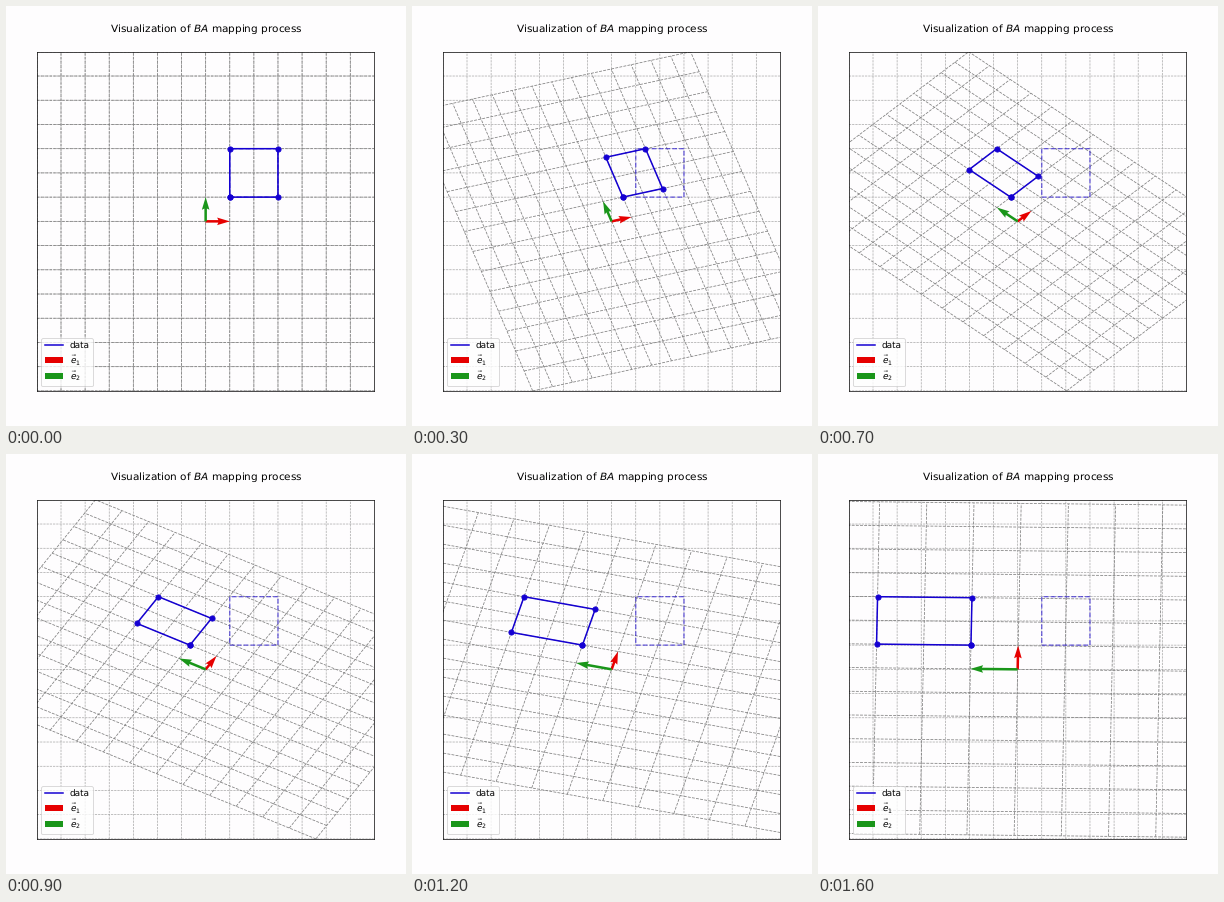
These frames come from a looping animation (400 px wide and 420 px high, 1700 ms). A matplotlib script:

```python
import numpy as np
import matplotlib.pyplot as plt
from matplotlib.animation import FuncAnimation

W, H, DPI = 400, 420, 62.5
FRAMES, INTERVAL = 17, 100
LIM = 7
PAPER, BLUE, RED, GREEN = "#fefdfe", "#1400d2", "#e60000", "#1a961a"

BA = np.array([[0, -2], [1, 0]])
SQUARE = np.array([[1, 3, 3, 1, 1], [1, 1, 3, 3, 1]])

plt.rcParams["text.hinting"] = "none"


def mapping(frame):
    """Blend linearly from the identity to BA."""
    t = np.interp(frame, [0, 2, 5, 7, 10, 12, 16],
                  [0, 0.111, 0.31, 0.43, 0.6115, 0.737, 0.979])
    return (1 - t) * np.eye(2) + t * BA


def grid_segments():
    ends = np.array([-LIM, LIM])
    for k in range(-LIM, LIM + 1):
        level = np.full(2, k)
        yield np.array([level, ends])
        yield np.array([ends, level])


fig = plt.figure(figsize=(W / DPI, H / DPI), dpi=DPI, facecolor=PAPER)
ax = fig.add_axes([30.9 / W, 1 - 384.9 / H, 337.5 / W, 339.1 / H],
                  facecolor=PAPER)
ax.set(xlim=(-LIM, LIM), ylim=(-LIM, LIM), xticks=[], yticks=[])
fig.text(0.5, 1 - 26 / H, "Visualization of $BA$ mapping process",
         ha="center", va="baseline", fontsize=12.1)


def draw(points, style, **kw):
    return ax.plot(*points, style, snap=False, **kw)[0]


segments = list(grid_segments())
for seg in segments:
    draw(seg, "--", color="0.6", lw=0.7, zorder=1)
grid = [draw(seg, "--", color="0.5", lw=0.9, zorder=1.5) for seg in segments]

draw(SQUARE, "--", color=BLUE, lw=1.5, alpha=0.6, zorder=2)
outline = draw(SQUARE, "-", color=BLUE, lw=1.75, zorder=3, label="data")
corners = draw(SQUARE, "o", color=BLUE, ms=6, zorder=3)


def basis_arrow(u, v, color, label):
    return ax.quiver([0], [0], [u], [v], color=color, label=label, zorder=4,
                     angles="xy", scale_units="xy", scale=1)


arrows = [basis_arrow(1, 0, RED, r"$\vec{e}_1$"),
          basis_arrow(0, 1, GREEN, r"$\vec{e}_2$")]
ax.legend(loc="lower left", fontsize=10.2, labelspacing=0.33).set_zorder(6)


def update(frame):
    m = mapping(frame)
    for line, seg in zip(grid, segments):
        line.set_data(*(m @ seg))
    for line in (outline, corners):
        line.set_data(*(m @ SQUARE))
    for arrow, (u, v) in zip(arrows, m.T):
        arrow.set_UVC([u], [v])
    return [*grid, outline, corners, *arrows]


anim = FuncAnimation(fig, update, frames=FRAMES, interval=INTERVAL,
                     repeat=True, repeat_delay=0, blit=False)
plt.show()
```
